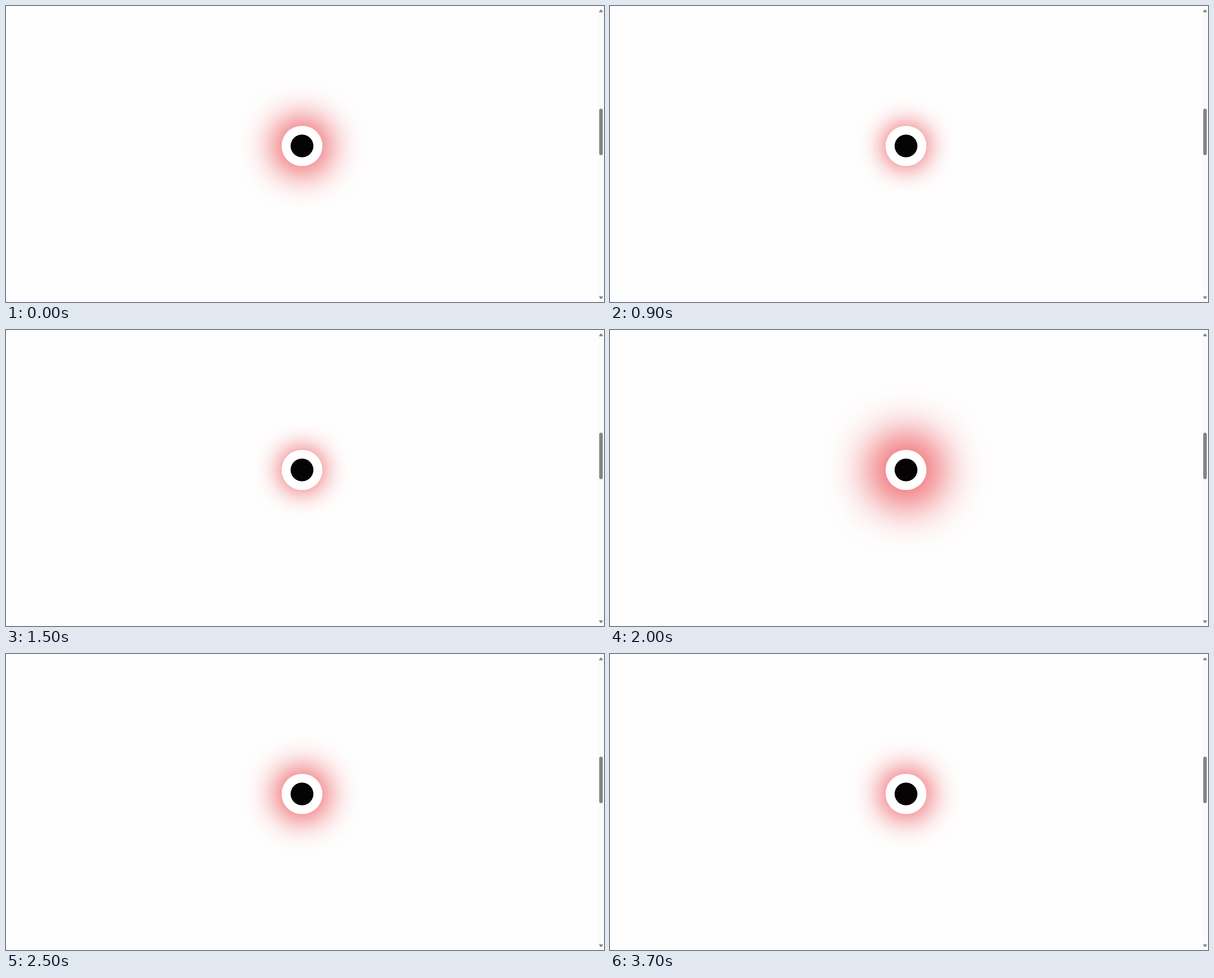
An HTML page for the animation above (3.8 s loop, 1000 px wide and 496 px high).

```html
<!DOCTYPE html>
<html lang="en">
<head>
<meta charset="utf-8">
<title>Pulsing glow</title>
<style>
  html, body { margin: 0; width: 100%; height: 100%; overflow: hidden; background: #fefefe; }
  div { position: absolute; }
  #badge {
    left: 461px; top: 200.7px; width: 67.5px; height: 67.5px;
    border-radius: 50%;
    background: radial-gradient(circle, #050304 18.6px, #fff 19.4px);
  }
  #track { right: 0; top: 0; width: 10px; height: 100%; background: #fbfbfb; }
  #thumb { left: 2px; top: 172px; width: 6px; height: 77.5px; border-radius: 3px; background: #858585; }
  svg {
    position: absolute; left: 1px; width: 8px; height: 6px;
    fill: #858585; stroke: #858585; stroke-linejoin: round;
  }
  #up { top: 4.5px; }
  #down { bottom: 4.5px; transform: scaleY(-1); }
</style>
</head>
<body>
<div id="badge"></div>
<div id="track">
  <svg id="up"><path d="M1 5h6l-3-4z"/></svg>
  <div id="thumb"></div>
  <svg id="down"><path d="M1 5h6l-3-4z"/></svg>
</div>
<script>
  // Two breaths, each a slow rise and a quicker fall, then a rest.
  const RISE = 1000, FALL = 700, REST = 400;
  const BREATH = RISE + FALL;
  const LOOP = 2 * BREATH + REST;
  const LEAD = 550;  // the page opens partway into the first rise
  const STEP = 100;  // the picture holds for this long

  const badge = document.getElementById('badge');
  const mix = (a, b, k) => a + (b - a) * k;
  const easeSine = u => (1 - Math.cos(Math.PI * u)) / 2;

  function level(t) {
    if (t >= 2 * BREATH) return 0;
    const b = t % BREATH;
    return easeSine(b < RISE ? b / RISE : (BREATH - b) / FALL);
  }

  function draw(t) {
    const k = level((t + LEAD) % LOOP);
    const blur = mix(30, 75, k);
    const spread = mix(-8, 29, k);
    badge.style.boxShadow = `0 0 ${blur}px ${spread}px rgb(236, 80, 85)`;
  }

  const start = performance.now();
  function tick() {
    const t = performance.now() - start;
    draw(Math.floor(t / STEP) * STEP);
    requestAnimationFrame(tick);
  }
  tick();
</script>
</body>
</html>
```
